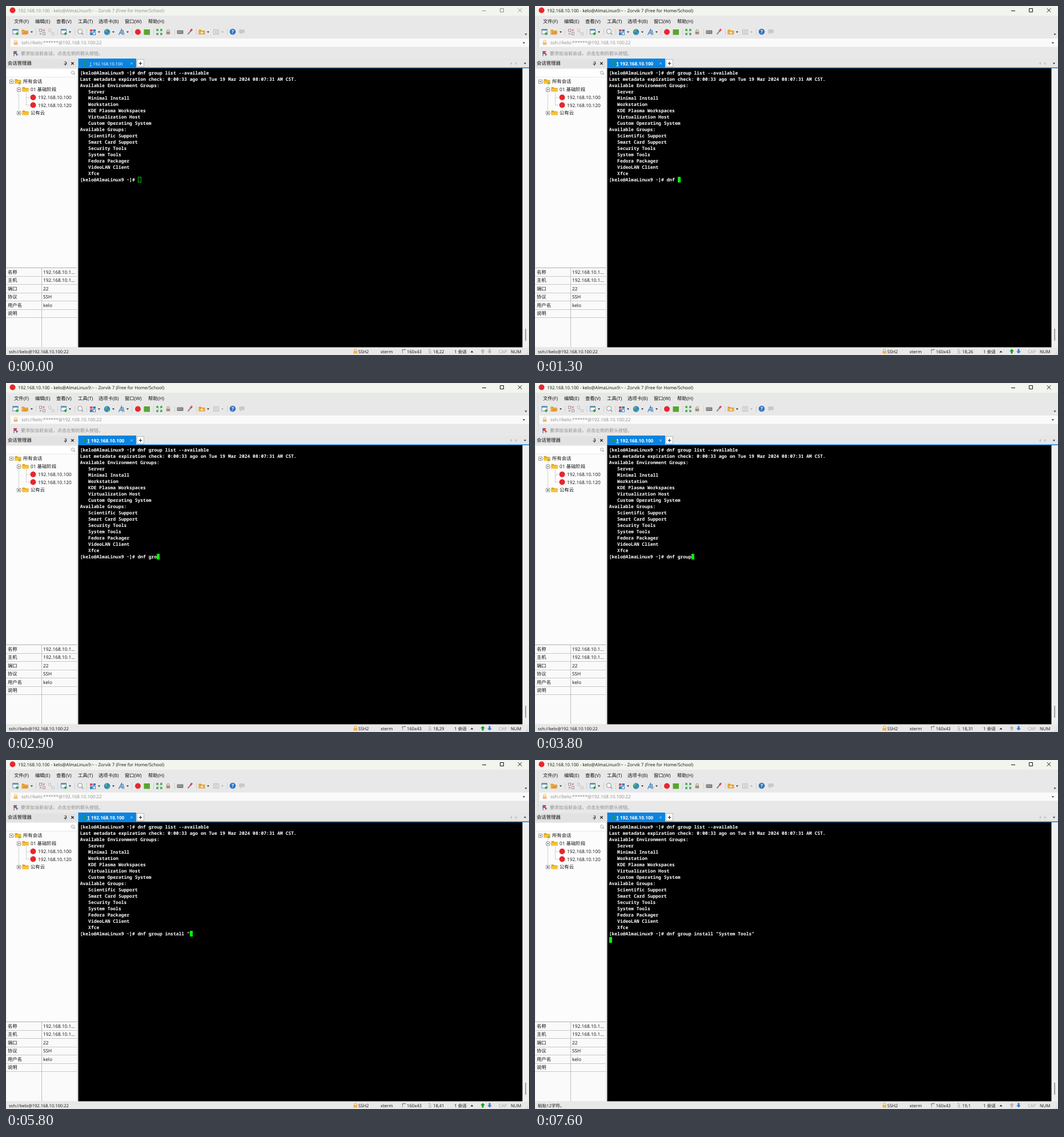
An HTML page that plays this animation: 916 by 611 pixels, repeating every 8 s.

```html
<!DOCTYPE html>
<html lang="zh">
<head>
<meta charset="utf-8">
<style>
html, body { margin: 0; width: 100%; height: 100%; overflow: hidden; background: #e8e8e8; }
svg { display: block; width: 916px; height: 611px; }
text { white-space: pre; text-rendering: geometricPrecision; font-family: 'Open Sans', 'Noto Sans CJK SC', 'Noto Sans CJK', sans-serif; }
.term, .term text { font: 700 8px 'Noto Sans Mono', 'DejaVu Sans Mono', monospace; fill: #fff; }
</style>
</head>
<body>
<svg id="stage" viewBox="0 0 916 611" xmlns="http://www.w3.org/2000/svg"></svg>
<script>
const USER = 'kelo', HOST = '192.168.10.100';
const PROMPT = `[${USER}@AlmaLinux9 ~]# `;
const CELL = 4.8, LEFT = 129.7;
const CHROME = '#e8e8e8';
const colX = col => LEFT + (col - 1) * CELL;

// shape helpers
const rect = (x, y, w, h, fill, more = '') => `<rect x="${x}" y="${y}" width="${w}" height="${h}" fill="${fill}" ${more}/>`;
const box = (x, y, w, h, stroke, fill = 'none') => rect(x + .5, y + .5, w - 1, h - 1, fill, `stroke="${stroke}"`);
const dot = (x, y, r, fill) => `<circle cx="${x}" cy="${y}" r="${r}" fill="${fill}"/>`;
const path = (d, stroke, width = 1, fill = 'none', more = '') => `<path d="${d}" stroke="${stroke}" stroke-width="${width}" fill="${fill}" ${more}/>`;
const fillPath = (d, fill, more = '') => `<path d="${d}" fill="${fill}" ${more}/>`;
const text = (x, y, s, size = 8.4, fill = '#111', more = '') => `<text x="${x}" y="${y}" font-size="${size}" fill="${fill}" ${more}>${s}</text>`;
const down = (x, y, fill = '#222') => fillPath(`M${x - 2} ${y - 1}h4l-2 2.4z`, fill);
const cross = (x, y, r, stroke, width = 1) => path(`M${x - r} ${y - r}l${2 * r} ${2 * r}m0 ${-2 * r}l${-2 * r} ${2 * r}`, stroke, width);
const plus = (x, y, r, stroke, width = 1) => path(`M${x - r} ${y}h${2 * r}M${x} ${y - r}v${2 * r}`, stroke, width);
const folder = (x, y, fill = '#f6c23c') => fillPath(`M${x - 5.5} ${y - 4}h4l1.5 1.5h5.5v6.5h-11z`, '#e2a21c') + rect(x - 5.5, y - 1.2, 11, 5.4, fill);
const lens = (x, y, r, stroke) => `<circle cx="${x}" cy="${y}" r="${r}" fill="#f4f8fc" stroke="${stroke}"/>` + path(`M${x + r * .7} ${y + r * .7}l${r * .7} ${r * .7}`, stroke, 1.4);
const lock = (x, y, fill) => path(`M${x - 2} ${y}v-2a2 2 0 0 1 4 0v2`, fill, 1.1) + rect(x - 3.3, y - .6, 6.6, 4.6, fill, 'rx=".6"');
const windowIcon = (x, y) => box(x - 5, y - 5, 10, 9, '#5b8bb0', '#fff') + rect(x - 5, y - 5, 10, 2.5, '#5b8bb0') + plus(x + 3, y + 3, 2.6, '#2ca43a', 1.8);
// dir 1 points up, -1 points down
const arrow = (id, x, dir) => `<path id="${id}" d="M${x} ${604.5 - 4 * dir}l4 ${4 * dir}h-2.5v${4 * dir}h-3v${-4 * dir}h-2.5z"/>`;

function titleBar() {
  return rect(0, 0, 916, 17, '#f2f5ee') + dot(11.5, 7.5, 5, '#e8262d') +
    `<g id="title">` + text(21, 10.7, `${HOST} - ${USER}@AlmaLinux9:~ - Zorvik 7 (Free for Home/School)`, 7.85, 'currentColor') +
    path('M834 8.5h7', 'currentColor') + path('M865.5 4.5h6v6h-6z', 'currentColor') + cross(900, 7.5, 3.3, 'currentColor') + '</g>';
}

function menuBar() {
  const items = [[14, '文件(F)'], [51, '编辑(E)'], [88, '查看(V)'], [126, '工具(T)'], [162, '选项卡(B)'], [208, '窗口(W)'], [249, '帮助(H)']];
  return rect(0, 17, 916, 75, CHROME) + items.map(([x, s]) => text(x, 30.3, s)).join('') +
    path('M5.5 21v70', '#bdbdbd', 1, 'none', 'stroke-dasharray="1 2"');
}

function toolBar() {
  const seps = [52, 90, 120, 141, 220, 258, 295, 333, 387];
  const drops = [45, 112, 163, 188, 213, 354];
  let s = seps.map(x => path(`M${x}.5 40v11`, '#cfcfcf')).join('') + drops.map(x => down(x, 45.5)).join('');
  s += windowIcon(16.5, 45.5);
  s += folder(33, 45.5, '#f0b45a') + fillPath('M28 50l2.5-5h9l-2.5 5z', '#e5973a');
  s += box(58, 40, 5, 5, '#9a9a9a') + box(64, 46, 5, 5, '#9a9a9a') + cross(66, 42.5, 2, '#d65a5a') + cross(60.5, 48.5, 1.6, '#d65a5a');
  s += box(74, 40, 5, 5, '#c6c6c6') + box(80, 46, 5, 5, '#c6c6c6') + path('M77 45l4 3', '#c6c6c6');
  s += windowIcon(101, 45.5);
  s += lens(129.5, 44.5, 4, '#8b8b8b');
  s += rect(147, 41, 4.5, 4, '#d9534f') + rect(152.5, 41, 4.5, 4, '#3d7fc1') + rect(147, 46, 4.5, 5, '#3d7fc1') + box(152, 46, 5, 5, '#3d7fc1', '#fff');
  s += dot(177, 45.5, 5.3, '#2f83c5') + fillPath('M173 43q3-3 5-1l-1 3-3 2zM178 47l3-1-1 3-2 1z', '#58b560');
  s += path('M197.5 50.5l5-9.5 1.5 9.5M199.5 47.5h4M205 42l1.5 8.5', '#3d7fc1', 1.4);
  s += dot(231, 45.5, 5, '#e8262d') + rect(241.5, 41, 10.5, 9.5, '#55a630');
  s += path('M264 44v-3h3M270 41h3v3M273 47v3h-3M267 50h-3v-3M264 41l3 3M273 41l-3 3M273 50l-3-3M264 50l3-3', '#35a24a', 1.3);
  s += lock(284, 45.5, '#a28f78');
  s += rect(299.5, 42.5, 11, 6.5, '#7c7c7c', 'rx="1"') + path('M301 44.5h8M301 46.5h8', '#eee', .8, 'none', 'stroke-dasharray="1 1"');
  s += path('M318.5 49.5l6-7', '#8a8a8a', 2) + path('M323 44l3-3.5', '#d9455f', 3);
  s += folder(343, 45.5, '#e9ac5d') + plus(343, 46.5, 2, '#fff', 1.2);
  s += box(363, 41, 10, 9, '#bcbcbc') + path('M365 43.5h6M365 45.5h6M365 47.5h6', '#c4c4c4') + down(379, 45.5, '#aaa');
  s += dot(397, 45, 5.3, '#2f74c0') + text(395, 48.2, '?', 8.5, '#fff', 'font-weight="700"');
  s += rect(408, 41, 10, 6.5, '#c9c9c9', 'rx="2"') + fillPath('M410 47v3l3-3z', '#c9c9c9');
  return s + down(910.5, 49.5);
}

function addressBar() {
  return rect(8, 57, 908, 14.5, '#fafafa') + lock(17, 64, '#efb978') +
    text(27, 67, `ssh://${USER}:******@${HOST}:22`, 8.05, '#8a8a8a') + down(907, 64.5) +
    fillPath('M13.5 79h6.5l-2 2.5 2 2.5h-6.5z', '#d6434d') + path('M14 79v9', '#4876b5', 1.2) + fillPath('M17 83l5 2-2.5 1-1 2z', '#4876b5') +
    text(26, 86.3, '要添加当前会话，点击左侧的箭头按钮。', 8, '#8c8c8c');
}

function sidePanel() {
  let s = rect(0, 92, 126, 506, CHROME) + rect(0, 93, 124, 15, '#e2e2e2') + text(3, 103.3, '会话管理器');
  s += path('M101.5 101.5h5M102.5 98h3v3M104 102v2.5', '#222') + cross(116.5, 100.5, 2.2, '#111', 1.2);
  s += rect(1, 110, 123, 14, '#fff') + lens(117, 116.5, 2.7, '#a6a6a6') + rect(1, 125, 123, 332, '#fcfcfc');
  s += path('M12 132.5h4M22.5 138v46M25 146.5h4M25 187.5h4M35.5 152v21.5M35.5 160.5h6M35.5 173.5h6', '#a8a8a8', 1, 'none', 'stroke-dasharray="1 1"');
  [[9, 132], [22, 146], [22, 187]].forEach(([x, y], i) => {
    s += box(x - 3, y - 3, 7, 7, '#969696', '#fff') + path(`M${x - 1} ${y + .5}h3` + (i > 1 ? `M${x + .5} ${y - 1}v3` : ''), '#333');
  });
  s += folder(21, 132) + dot(24, 135, 2.2, '#9cbb41') + folder(34, 146) + folder(34, 187);
  s += dot(47.5, 160, 5, '#e8262d') + dot(47.5, 173.5, 5, '#e8262d');
  s += text(30, 135.3, '所有会话') + text(43, 149.2, '01 基础阶段') + text(56, 163, HOST, 8.3) + text(56, 176.5, '192.168.10.120', 8.3) + text(43, 190.3, '公有云');

  s += rect(0, 459, 124, 138, '#fafafa');
  const rows = [['名称', '192.168.10.1...'], ['主机', '192.168.10.1...'], ['端口', '22'], ['协议', 'SSH'], ['用户名', USER], ['说明', '']];
  rows.forEach(([key, value], i) => {
    const y = 466 + i * 14.45;
    s += text(3, y + 3, key) + text(65, y + 3, value, 8.3) + path(`M0 ${Math.round(y + 7) + .5}h124`, '#c8c8c8');
  });
  return s + path('M0 458.5h124M62.5 459v138', '#bebebe');
}

function tabBar() {
  return rect(126.5, 92, 789.5, 17, '#e6e6e6') + rect(126.5, 92, 101.5, 17, '#0a84e0') + rect(126.5, 107.5, 789.5, 1.5, '#0a84e0') +
    dot(138, 100.5, 2.6, '#12a32c') + '<g id="tab"></g>' + cross(220, 100.5, 1.8, '#b9dcf7', .9) +
    box(229, 93, 13, 14, '#b9b9b9', '#fafafa') + plus(235.5, 100.5, 2.8, '#222', 1.2) +
    fillPath('M886 98v5l-3-2.5z', '#bcbcbc') + fillPath('M892 98v5l3-2.5z', '#bcbcbc') + down(909, 100.5);
}

function terminal() {
  const lines = [
    PROMPT + 'dnf group list --available',
    'Last metadata expiration check: 0:00:33 ago on Tue 19 Mar 2024 08:07:31 AM CST.',
    'Available Environment Groups:',
    '   Server', '   Minimal Install', '   Workstation', '   KDE Plasma Workspaces', '   Virtualization Host', '   Custom Operating System',
    'Available Groups:',
    '   Scientific Support', '   Smart Card Support', '   Security Tools', '   System Tools', '   Fedora Packager', '   VideoLAN Client', '   Xfce'
  ];
  return rect(904, 109, 12, 489, '#f0f0f0') + rect(909.5, 565, 1.5, 21, '#858585') + rect(126.5, 109, 778, 488.5, '#000') +
    '<g class="term">' + lines.map((s, i) => `<text x="${LEFT}" y="${120 + 11 * i}">${s}</text>`).join('') +
    `<g id="live"></g></g>`;
}

function statusBar() {
  const put = (x, s, fill) => text(x, 607.6, s, 7.7, fill);
  return rect(0, 597, 916, 14, CHROME) +
    `<text id="note" x="5" y="607.6" font-size="7.55" fill="#111"></text>` +
    lock(612, 604.5, '#efb04f') + put(617, 'SSH2') + put(656, 'xterm') +
    path('M694.5 608v-6.5h5M693 603l1.5-1.5 1.5 1.5M698 600l1.5 1.5-1.5 1.5', '#777', .8) + put(702, '160x43') +
    path('M740 601.5h3M740 604.5h2M740 607.5h5M743.5 603v3', '#888', .8) +
    `<text id="pos" x="748" y="607.6" font-size="7.7" fill="#111"></text>` +
    put(785, '1 会话') + fillPath('M813.5 606.5h5l-2.5-3z', '#222') +
    arrow('up', 835, 1) + arrow('dn', 847, -1) + put(863, 'CAP', '#9a9a9a') + put(884, 'NUM') +
    [[913, 609], [910, 609], [913, 606]].map(([x, y]) => rect(x, y, 1, 1, '#aaa')).join('');
}

// the terminal comes last so its soft edges blend with the bars around it
document.getElementById('stage').innerHTML =
  titleBar() + menuBar() + toolBar() + addressBar() + sidePanel() + tabBar() + statusBar() + terminal();

// [ms, typed command, sending, caret steps back from the end]
const steps = [
  [0, '', 0],
  [1000, 'd', 1], [1100, 'dn', 1], [1200, 'dnf', 1], [1300, 'dnf ', 1],
  [1500, 'dnf ', 0], [1600, 'dnf g', 1], [1800, 'dnf gr', 1], [1900, 'dnf gro', 1],
  [2100, 'dnf grop', 1], [2200, 'dnf gropu', 1], [2400, 'dnf gropu', 0],
  [2700, 'dnf grop', 1], [2900, 'dnf gro', 1], [3100, 'dnf gro', 0], [3200, 'dnf grou', 1],
  [3600, 'dnf group', 1], [3800, 'dnf group', 0], [4100, 'dnf group ', 1],
  [4300, 'dnf group i', 1], [4400, 'dnf group in', 1], [4500, 'dnf group inst', 1], [4600, 'dnf group insta', 1], [4700, 'dnf group instal', 1],
  [4900, 'dnf group install', 1], [5000, 'dnf group install ', 1], [5200, 'dnf group install ', 0],
  [5800, 'dnf group install "', 1], [5900, 'dnf group install ""', 1],
  [6100, 'dnf group install ""', 0], [6200, 'dnf group install ""', 1, 1], [6400, 'dnf group install ""', 0, 1],
  [6900, 'dnf group install "System Tools"', 1, 1], [7100, 'dnf group install "System Tools"', 0, 1],
  [7500, 'dnf group install "System Tools"', 1], [7600, 'dnf group install "System Tools"', 0]
];
const LOOP = 8000, FOCUS = 300, PASTE = 6900, ENTER = 7500;
const $ = id => document.getElementById(id);
let shown = '';

function draw(t) {
  const [at, cmd, sending, back = 0] = steps.findLast(s => s[0] <= t);
  const focused = t >= FOCUS, pasted = t >= PASTE, entered = t >= ENTER;
  const key = at + '|' + focused;
  if (key === shown) return;
  shown = key;

  const col = entered ? 1 : PROMPT.length + cmd.length - back + 1;
  const row = entered ? 19 : 18, top = 299 + (row - 18) * 11;
  let live = `<text x="${LEFT}" y="307">${PROMPT + cmd}</text>`;
  if (pasted && !entered) {
    live += rect(322, 299, 58, 11, '#fff') + `<text x="${colX(41)}" y="307" style="fill:#000">System Tools</text>`;
  }
  const x = Math.round(colX(col));
  live += focused ? rect(x, top, 5, 10, '#0f0') : box(x, top, 6, 10, '#0c0');
  if (back) live += `<text x="${colX(col)}" y="307" style="fill:#000">"</text>`;
  $('live').innerHTML = live;

  $('title').style.color = focused ? '#111' : '#8c8c8c';
  const tabName = `<tspan text-decoration="underline">1</tspan> ${HOST}`;
  $('tab').innerHTML = focused
    ? text(142, 103.5, tabName, 8.2, '#fff', 'font-weight="700"')
    : text(146, 103.5, tabName, 7.35, '#fff');
  $('pos').textContent = `${row},${col}`;
  $('note').textContent = pasted ? '粘贴12字符。' : `ssh://${USER}@${HOST}:22`;
  $('up').setAttribute('fill', sending ? '#0b9a1c' : '#b4b4b4');
  $('dn').setAttribute('fill', focused ? '#3f78d0' : '#b4b4b4');
}

const start = performance.now();
function tick() {
  draw((performance.now() - start) % LOOP);
  requestAnimationFrame(tick);
}
tick();
</script>
</body>
</html>
```
